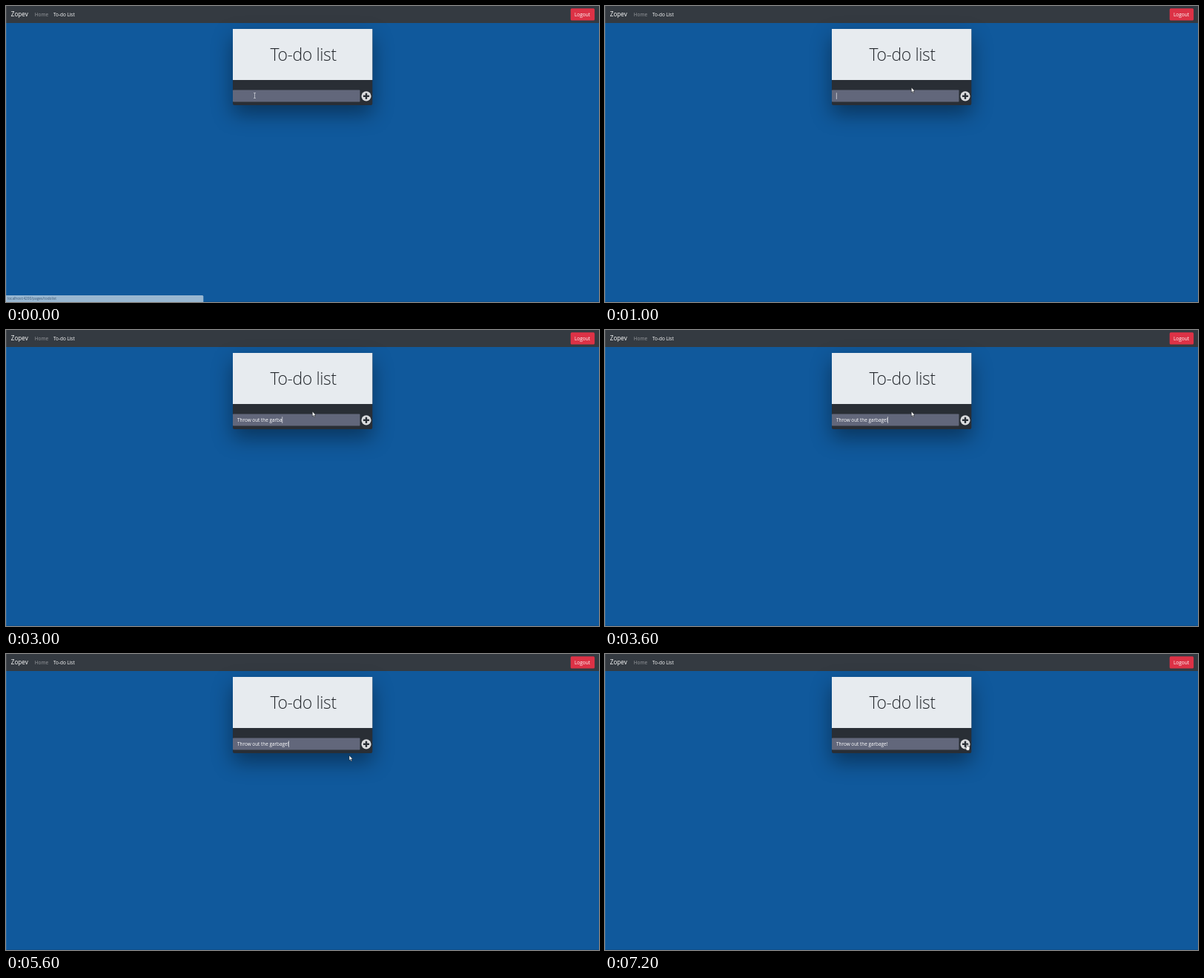
Animation, 800 px wide and 400 px high, one loop 8 s. Source, as an HTML page with a canvas:

```html
<!DOCTYPE html>
<html lang="en">
<head>
<meta charset="utf-8">
<title>To-do list</title>
<style>
  html, body { margin: 0; width: 100%; height: 100%; overflow: hidden; background: #10599c; }
  canvas { display: block; width: 800px; height: 400px; }
</style>
</head>
<body>
<canvas id="stage" width="800" height="400"></canvas>
<script>
const ctx = document.getElementById('stage').getContext('2d');
const LOOP = 8000;
const FAMILY = '"Open Sans", "Noto Sans", sans-serif';
const TASK = 'Throw out the garbage!';
const DARK = '#292e35';

// The screen refreshes every 200 ms and rests at the end of each second
function refreshed(t) {
  if (t >= 7000) return t < 7200 ? 6600 : 7200;
  const sec = Math.floor(t / 1000) * 1000;
  return sec + Math.min(600, Math.floor((t - sec) / 200) * 200);
}

function ease(t, from, to) {
  const f = Math.min(1, Math.max(0, (t - from) / (to - from)));
  return f * f * (3 - 2 * f);
}

function pointerAt(t) {
  const enter = ease(t, 0, 600);
  const leave = ease(t, 3800, 4400);
  const drift = ease(t, 4600, 5600);
  const reach = ease(t, 5600, 6400);
  return [
    335.5 + 77.8 * enter + 32.9 * leave + 16.8 * drift + 25.3 * reach,
    121 - 11 * enter + 25.5 * leave + 1.5 * drift - 15.4 * reach
  ];
}

function typedAt(t) {
  return TASK.slice(0, Math.max(0, Math.floor((t - 1300) * 0.0112)));
}

// Solid while typing, blinking afterwards
function caretOn(t) {
  return t >= 1000 && (t < 4000 || t % 1000 >= 400);
}

function rect(x, y, w, h, color, radius = 0) {
  ctx.fillStyle = color;
  ctx.beginPath();
  ctx.roundRect(x, y, w, h, radius);
  ctx.fill();
}

function text(str, x, y, size, color, weight = 500, spacing = 0) {
  ctx.font = `${weight} ${size}px ${FAMILY}`;
  ctx.letterSpacing = spacing + 'px';
  ctx.fillStyle = color;
  ctx.fillText(str, x, y);
}

function drawNav() {
  rect(0, 0, 800, 23, '#343a41');
  text('Zopev', 6.8, 14.3, 8.1, '#fff');
  text('Home', 38.8, 14, 6.45, '#999ca0');
  text('To-do List', 64, 14, 6.4, '#fff');
  rect(761.7, 3.3, 32.4, 16.3, '#dc3246', 1.6);
  text('Logout', 767, 14, 6.5, '#fff');
}

function drawCard() {
  ctx.save();
  ctx.shadowColor = 'rgba(0, 0, 0, 0.4)';
  ctx.shadowBlur = 28;
  ctx.shadowOffsetY = 12;
  rect(306, 31, 188.3, 103, DARK, [0, 0, 2, 2]);
  ctx.restore();
  rect(306, 31, 188.3, 69, '#e7ebef');
  text('To-do list', 356.4, 74, 23, '#24282d', 300, -0.4);
  rect(306, 113.4, 171.5, 16.2, '#62677b', 0.8);

  ctx.fillStyle = '#dcdddf';
  ctx.beginPath();
  ctx.arc(486, 121.8, 6.6, 0, Math.PI * 2);
  ctx.fill();
  rect(481.9, 120.6, 8.2, 2.4, DARK);
  rect(484.8, 117.7, 2.4, 8.2, DARK);
}

function drawField(t) {
  const str = typedAt(t);
  text(str, 312, 124.3, 6.4, '#fff');
  if (caretOn(t)) rect(311.9 + ctx.measureText(str).width, 117.2, 0.7, 8.8, '#e9eaee');
}

function drawStatus(t) {
  ctx.globalAlpha = 1 - ease(t, 0, 400);
  rect(0, 391, 266.3, 9, '#98b7d1', [0, 1.5, 0, 0]);
  text('localhost:4200/pages/todolist', 2, 397.3, 4.8, '#3f5a75', 400);
  ctx.globalAlpha = 1;
}

function drawBeam(x, y) {
  rect(x - 0.35, y - 3.2, 0.7, 6.4, '#d3d5dc');
  for (const end of [-3.7, 3]) rect(x - 1.5, y + end, 3, 0.7, '#d3d5dc');
}

function drawShape(path, x, y) {
  ctx.save();
  ctx.translate(x, y);
  const shape = new Path2D(path);
  ctx.fillStyle = '#fff';
  ctx.fill(shape);
  ctx.lineJoin = 'round';
  ctx.lineWidth = 0.5;
  ctx.strokeStyle = '#11151a';
  ctx.stroke(shape);
  ctx.restore();
}

function drawPointer(t) {
  const [x, y] = pointerAt(t);
  if (t < 600) drawBeam(x, y);
  else if (t < 6400) drawShape('M0 0V6.8L1.5 5.4L2.6 8L3.7 7.5L2.6 5H4.7Z', x, y);
  else drawShape('M-.7 .5Q0 -.4 .6 .5L.8 3L3.4 3.7Q4.2 4.5 3.4 7.3L3 8.6H-.4L-2.4 5.6L-1.9 4.9L-.7 5.6Z', x, y);
}

function draw(t) {
  rect(0, 0, 800, 400, '#10599c');
  rect(0, 399, 800, 1, '#0e4f8c');
  drawNav();
  drawCard();
  drawField(t);
  drawStatus(t);
  rect(0, 0, 1, 400, 'rgba(255, 255, 255, 0.1)');
  drawPointer(t);
}

const start = performance.now();
function tick() {
  draw(refreshed((performance.now() - start) % LOOP));
  requestAnimationFrame(tick);
}
tick();
</script>
</body>
</html>
```
